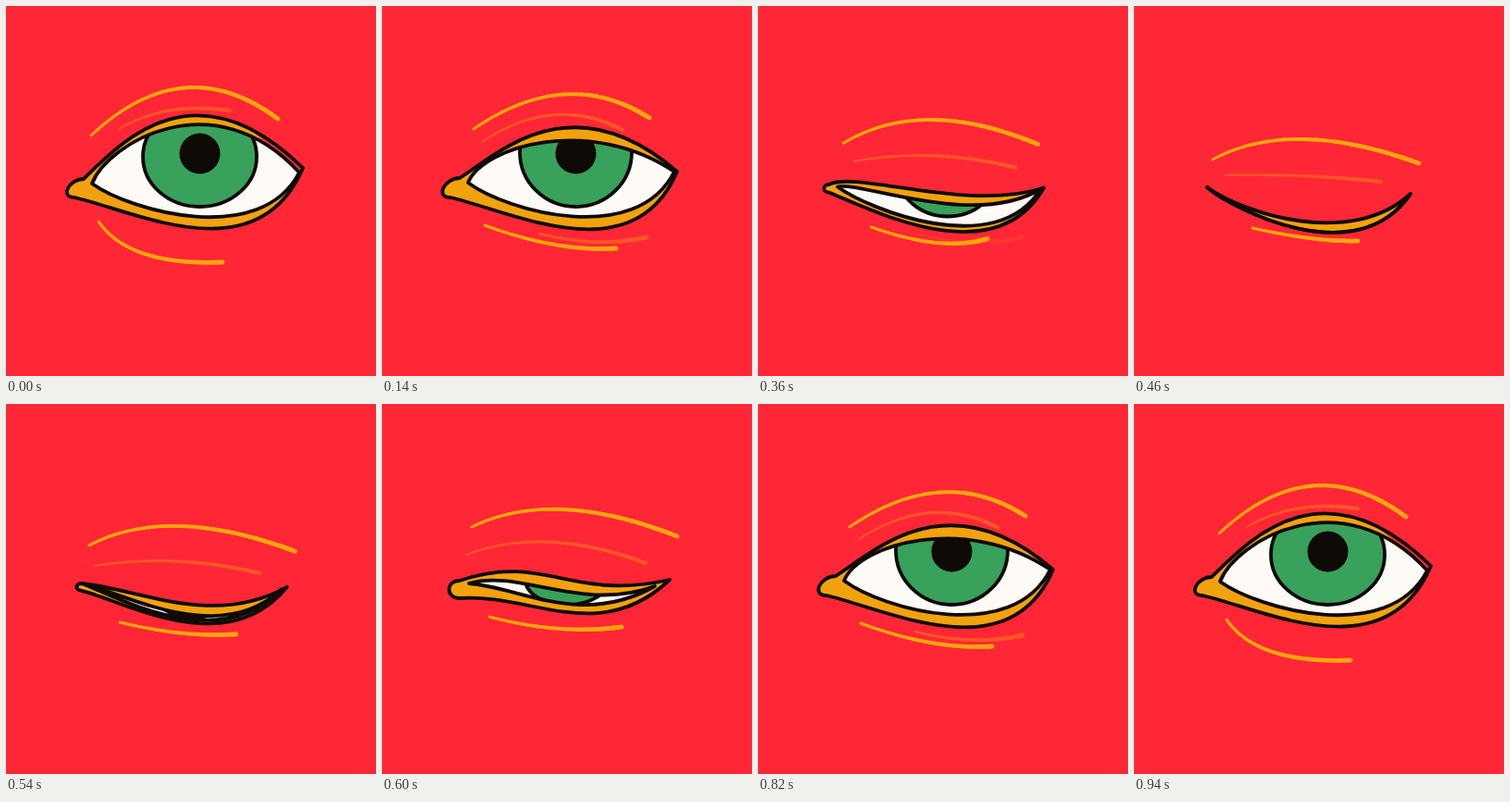
An HTML page with a canvas for the animation above (960 ms loop, 400 px wide and 400 px high).

```html
<!DOCTYPE html>
<html lang="en">
<head>
<meta charset="utf-8">
<title>Blinking eye</title>
<style>
  html, body { margin: 0; width: 100%; height: 100%; overflow: hidden; background: #ff2735; }
  canvas { display: block; width: 400px; height: 400px; }
</style>
</head>
<body>
<canvas id="stage" width="400" height="400"></canvas>
<script>
const ctx = document.getElementById('stage').getContext('2d');
const RED = '#ff2735', GOLD = '#f2a20d', LINE = '#ffa50f', ORANGE = '#ff5626',
      GREEN = '#38a15b', WHITE = '#fefaf6', INK = '#0e0a06';
const LOOP = 960, STEP = 20, INK_WIDTH = 3.8;

// Lids are cubic curves, skin folds are quadratic ones: [start, controls, end].
// lidBot borrows its end from lidTop, eyeBot borrows both ends from eyeTop.
const base = { lidBot: [74,207, 140,222, 272,290], eyeBot: [135,222, 275,261], gap: [0], low: [0] };

const open = { ...base,
  lidTop: [84,187, 125,146, 205,62, 321,175],
  eyeTop: [93,192, 110,148, 225,80, 317,180],
  iris: [209.5,163, 61.5,54],
  brow: [92,140, 192,46, 294,122],
  crease: [122,133, 172,103, 242,113],
  under: [100,233, 133,281, 234,277],
  gap: [1]
};
const relaxed = { ...base,
  lidTop: [84,186, 125,160, 205,81, 319,179],
  eyeTop: [93,191, 110,151, 225,118, 316,179],
  iris: [209.5,158, 60.5,59],
  brow: [99,133, 200,64, 289,121],
  crease: [108,147, 186,95, 260,134],
  under: [111,237, 189,266, 253,262],
  low: [1]
};
const half = { ...base,
  lidTop: [74,190, 95,130, 215,185, 319,190],
  eyeTop: [93,195, 110,158, 225,193, 312,193],
  iris: [205,165, 56,50],
  brow: [99,131, 185,74, 297,129],
  crease: [109,153, 190,124, 289,159],
  under: [117,238, 204,278, 254,249],
  low: [0.4]
};
const closed = { ...base,
  lidTop: [79,196, 120,225, 235,262, 299,203],
  lidBot: [79,196, 105,218, 240,290],
  eyeTop: [79,196, 105,218, 240,290, 299,203],
  eyeBot: [105,218, 240,290],
  iris: [205,200, 50,40],
  brow: [85,166, 170,120, 308,170],
  crease: [99,183, 185,181, 267,190],
  under: [128,240, 195,255, 242,254]
};
const waking = { ...base,
  lidTop: [84,191, 175,160, 205,214, 311,190],
  lidBot: [84,210, 160,204, 235,262],
  eyeTop: [94,194, 150,178, 215,226, 295,197],
  eyeBot: [150,198, 215,242],
  iris: [200,190, 45,27],
  brow: [97,133, 185,90, 319,143],
  crease: [91,163, 176,131, 285,172],
  under: [116,230, 192,250, 259,241]
};

const timeline = [
  [0, open], [20, open], [140, relaxed], [280, half], [440, closed],
  [500, closed], [600, waking], [820, relaxed], [940, open], [LOOP, open]
];

const mix = (a, b, k) => a + (b - a) * k;

function poseAt(t) {
  const i = timeline.findIndex(([end]) => t < end);
  const [t0, a] = timeline[i - 1], [t1, b] = timeline[i];
  const k = (t - t0) / (t1 - t0), pose = {};
  for (const key in a) pose[key] = a[key].map((v, n) => mix(v, b[key][n], k));
  return pose;
}

// The inner corner rounds off in proportion to the distance between the lids.
function lidShape([x0, y0, ...top], [x1, y1, ax, ay, bx, by]) {
  const path = new Path2D(), round = (y1 - y0) * 0.8;
  path.moveTo(x0, y0);
  path.bezierCurveTo(...top);
  path.bezierCurveTo(bx, by, ax, ay, x1, y1);
  path.bezierCurveTo(x1 - round, y1, x0 - round, y0, x0, y0);
  path.closePath();
  return path;
}

const eyeShape = (top, bottom) => lidShape(top, [top[0], top[1], ...bottom]);

function oval(x, y, rx, ry) {
  const path = new Path2D();
  path.ellipse(x, y, rx, ry, 0, 0, Math.PI * 2);
  return path;
}

function fill(path, color) {
  ctx.fillStyle = color;
  ctx.fill(path);
}

function ink(path) {
  ctx.strokeStyle = INK;
  ctx.lineWidth = INK_WIDTH;
  ctx.stroke(path);
}

// Stroke that swells from width w0 to w1.
function brush([x0, y0, cx, cy, x1, y1], w0, w1, color, alpha = 1) {
  const at = u => [mix(mix(x0, cx, u), mix(cx, x1, u), u), mix(mix(y0, cy, u), mix(cy, y1, u), u)];
  const parts = 32;
  ctx.globalAlpha = alpha;
  ctx.strokeStyle = color;
  for (let i = 0; i < parts; i++) {
    ctx.lineWidth = mix(w0, w1, i / parts);
    ctx.beginPath();
    ctx.moveTo(...at(i / parts));
    ctx.lineTo(...at((i + 1) / parts));
    ctx.stroke();
  }
  ctx.globalAlpha = 1;
}

function clipped(path, paint) {
  ctx.save();
  ctx.clip(path);
  paint();
  ctx.restore();
}

function draw(p) {
  ctx.fillStyle = RED;
  ctx.fillRect(0, 0, 400, 400);
  ctx.lineCap = ctx.lineJoin = 'round';

  brush(p.brow, 3, 5, LINE);
  brush(p.crease, 2, 4.2, ORANGE);
  brush([170, 246, 232, 262, 286, 250], 2.5, 5, ORANGE, p.low[0]);
  brush(p.under, 3, 5, LINE);

  const lid = lidShape(p.lidTop, p.lidBot), eye = eyeShape(p.eyeTop, p.eyeBot);
  fill(lid, GOLD);
  clipped(lid, () => {
    ctx.globalAlpha = p.gap[0];
    fill(new Path2D('M258 128L318 180L325 120Z'), RED);
  });
  fill(eye, WHITE);
  clipped(eye, () => {
    const iris = oval(...p.iris);
    fill(iris, GREEN);
    ink(iris);
    fill(oval(209.5, 159.5, 22, 22), INK);
  });
  ink(eye);
  ink(lid);
}

function tick() {
  const t = performance.now() % LOOP;
  draw(poseAt(Math.floor(t / STEP) * STEP));
  requestAnimationFrame(tick);
}
tick();
</script>
</body>
</html>
```
